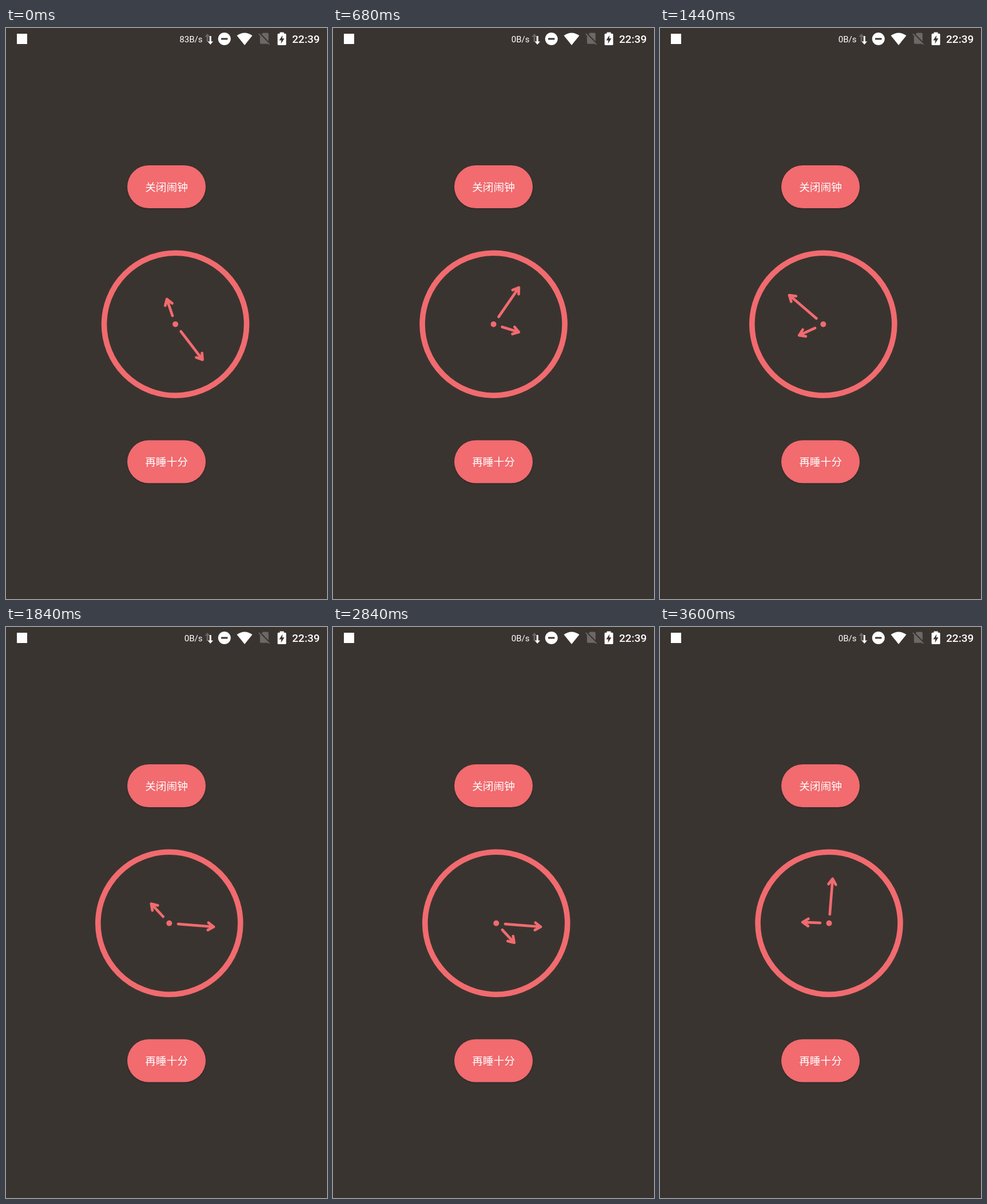
Write an HTML page that moves like this. It is 561x998 px and loops after 3640 ms.

```html
<!DOCTYPE html>
<html lang="zh-CN">
<head>
<meta charset="utf-8">
<title>闹钟</title>
<style>
  html, body { margin: 0; width: 100%; height: 100%; overflow: hidden; background: #3a3430; }
  svg { display: block; width: 100%; height: 100%; }
  .status { fill: #fff; font-family: Roboto, sans-serif; }
  .status text { text-anchor: end; }
  .dim { fill: #6d6865; }
  .bg { fill: #3a3430; }
  .button rect { fill: #f16b6f; filter: drop-shadow(0 1.5px 1.5px rgba(0, 0, 0, .28)); }
  .button text { fill: #fff; font: 18.7px "Noto Sans CJK SC", "Noto Sans CJK", sans-serif; text-anchor: middle; }
  #clock { fill: none; stroke: #f16b6f; stroke-width: 4.7; stroke-linecap: round; stroke-linejoin: round; }
  #clock .face { stroke-width: 9.6; }
  #clock .pin { fill: #f16b6f; stroke: none; }
</style>
</head>
<body>
<svg viewBox="0 0 561 998">
  <g class="status">
    <rect x="19" y="10" width="18" height="18"/>
    <text id="speed" x="343.5" y="25" font-size="15">83B/s</text>
    <path class="dim" d="M352 10l4.6 5.2h-3.2V24h-2.8v-8.8h-3.2z"/>
    <path d="M357.2 29l-4.8-5.4h3.3V14h3v9.6h3.3z"/>
    <circle cx="381.7" cy="19" r="11"/>
    <rect class="bg" x="376" y="17.5" width="11.4" height="3"/>
    <path d="M417 30L403.5 13.2Q417 3.6 430.5 13.2z"/>
    <path class="dim" transform="translate(438.5 5.3) scale(1.07)" d="M19 5c0-1.1-.9-2-2-2h-7L7.66 5.34 19 16.68zM3.65 3.88L2.38 5.15 5 7.77V19c0 1.1.9 2 2 2h10c.35 0 .67-.1.96-.26l1.88 1.88 1.27-1.27z"/>
    <path d="M478.6 7.5h7v2.3h2.4q1.6 0 1.6 1.6v17q0 1.6-1.6 1.6h-11.8q-1.6 0-1.6-1.6v-17q0-1.6 1.6-1.6h2.4z"/>
    <path class="bg" d="M483.4 12.5l-6 9h3.8l-.7 6 6-9.2h-3.8z"/>
    <text x="548.3" y="26" font-size="19" font-weight="500">22:39</text>
  </g>

  <g class="button">
    <rect x="212" y="240" width="137" height="75" rx="37.5"/>
    <text x="280.5" y="284.8">关闭闹钟</text>
  </g>
  <g class="button">
    <rect x="212" y="720.5" width="137" height="75" rx="37.5"/>
    <text x="280.5" y="765.2">再睡十分</text>
  </g>

  <g id="clock">
    <circle class="face" r="124.5"/>
    <circle class="pin" r="5"/>
    <path id="minute" d="M0-15.7V-78M-6.4-68.2L0-78L6.4-68.2"/>
    <path id="hour" d="M0-15.7V-46.3M-6.4-36.5L0-46.3L6.4-36.5"/>
  </g>
</svg>
<script>
  const LOOP = 3640, STEP = 40, TICK = 1000 / 60;
  const [clock, minute, hour, speed] =
    ['clock', 'minute', 'hour', 'speed'].map(id => document.getElementById(id));
  const turn = (hand, deg) => hand.setAttribute('transform', `rotate(${deg})`);

  // Picture steps at 25 per second, sampled from 60 Hz motion.
  function motionTime(t) {
    const n = Math.floor(t / STEP);
    return (n ? Math.ceil(n * 12 / 5) + 25 : 24) * TICK - 4;
  }

  function draw(t) {
    const m = motionTime(t);
    const x = 280.5 + 7.8 * (1 + Math.cos(m * Math.PI / 100));
    clock.setAttribute('transform', `translate(${x} 517.8)`);
    turn(minute, m * .36);
    turn(hour, m * .18 + 270);
    speed.textContent = t < 480 ? '83B/s' : '0B/s';
  }

  const start = performance.now();
  function loop() {
    draw((performance.now() - start) % LOOP);
    requestAnimationFrame(loop);
  }
  loop();
</script>
</body>
</html>
```
